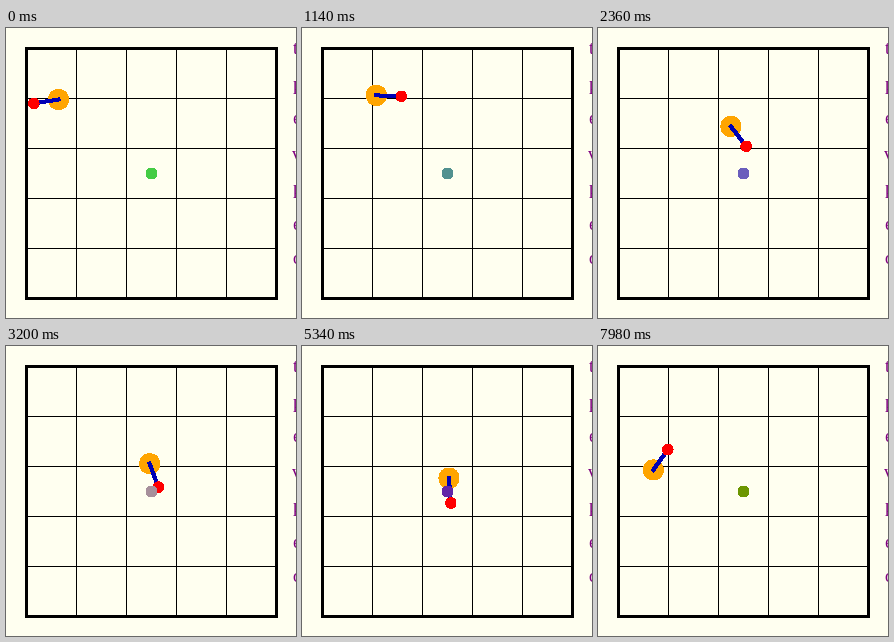
These frames come from a looping animation (290 px wide and 290 px high, 8 s). A matplotlib script:

```python
import numpy as np
import matplotlib.pyplot as plt
from matplotlib.animation import FuncAnimation
from matplotlib.colors import LinearSegmentedColormap
from matplotlib.patches import Circle, Rectangle

SIZE, TICK, LOOP = 290, 20, 8000
PX = 0.72                    # one pixel in points at 100 dpi
STEPS, RESTART = 172, 155    # steps in a loop, step of the second start
STARTS = [(52, 71), (54, 125)]
GOAL = np.array([145, 145])
ARM, STOP = 25, 12           # body to head, body to goal at rest
SPEED, SETTLE = 0.051, 0.034
SWING = 25                   # steps of the first wide turn

DOT = LinearSegmentedColormap.from_list("dot", [
    "#44cc44", "#54889a", "#7250c8", "#fffa50", "#6420b0", "#408200",
    "#6c9600"])


def step_at(ms):
    """Steps last 20, 20 and 100 ms in turn."""
    if ms < 20:
        return 0
    turns, rest = divmod(ms - 20, 140)
    return 1 + 3 * turns + (rest >= 100) + (rest >= 120)


def heading(n):
    """Eased swing from left over the top to the right, then settle down."""
    if n < SWING:
        u = n / SWING
        angle = 171 + 191 * u * u * (3 - 2 * u)
    else:
        angle = 450 - 88 * np.exp(-SETTLE * (n - SWING))
    a = np.radians(angle)
    return np.array([np.cos(a), np.sin(a)])


def drive(start, count):
    """Steer to the goal, moving only while facing it."""
    pos, path = np.array(start, float), []
    for n in range(count):
        path.append((pos.copy(), pos + ARM * heading(n)))
        aim = heading(n + 0.5)
        gap = GOAL - pos
        dist = np.hypot(*gap)
        facing = max(0, gap @ aim / dist)
        pos += SPEED * (dist - STOP) * facing * aim
    return path


poses = drive(STARTS[0], RESTART) + drive(STARTS[1], STEPS - RESTART)

fig = plt.figure(figsize=(2.9, 2.9), dpi=100, facecolor="#fffff0")
ax = fig.add_axes([0, 0, 1, 1])
ax.set_xlim(-0.5, SIZE - 0.5)
ax.set_ylim(SIZE - 0.5, -0.5)
ax.axis("off")

# The small shift keeps lines on their pixel when they snap.
low, high = 19.7, 269.7
for p in np.arange(low + 50, high - 1, 50):
    for xs, ys in (([p, p], [low, high]), ([low, high], [p, p])):
        ax.plot(xs, ys, color="black", lw=PX, aa=False, zorder=1)
ax.add_patch(Rectangle((low, low), 250, 250, fill=False, ec="black",
                       lw=3 * PX, aa=False, zorder=1))
for row, letter in enumerate("tpevpec"):
    ax.text(286, 26 + 35 * row, letter, color="purple", size=18 * PX,
            family="Liberation Serif", va="baseline", clip_on=True)


def disc(radius, color, z):
    return ax.add_patch(Circle(GOAL, radius, fc=color, ec="none", aa=False,
                               zorder=z))


body = disc(10, "orange", 2)
arm, = ax.plot([], [], color="#0000b4", lw=3 * PX, zorder=3, aa=False)
head = disc(5.2, "red", 4)
dot = disc(5.2, "green", 5)


def draw(frame):
    step = step_at(frame * TICK)
    base, tip = poses[step]
    body.center = base
    head.center = tip
    arm.set_data(*zip(base, tip))
    dot.set_facecolor(DOT(step / (STEPS - 1)))
    return body, arm, head, dot


anim = FuncAnimation(fig, draw, frames=LOOP // TICK, interval=TICK,
                     init_func=lambda: draw(0), repeat=True, repeat_delay=0)
plt.show()
```
